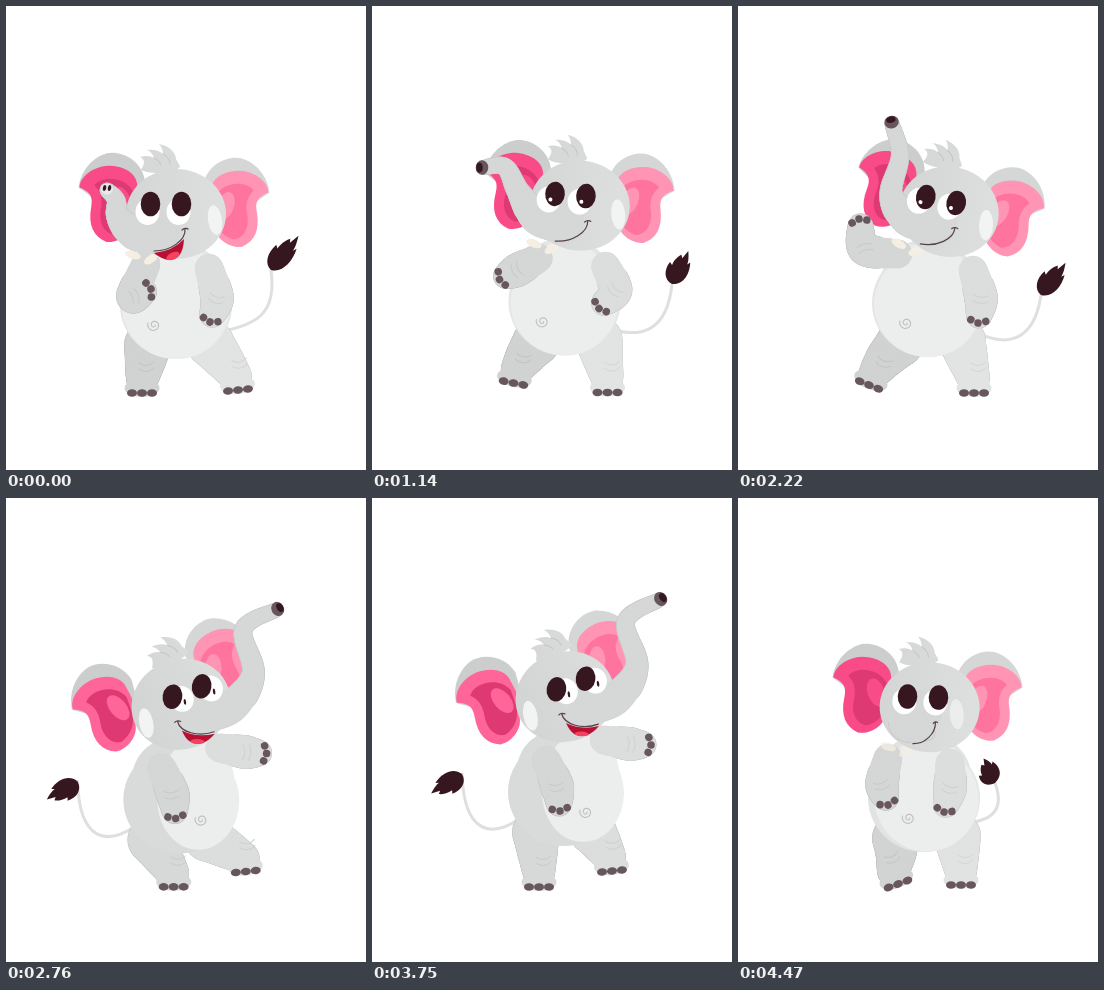
These frames come from a looping animation (360x464 px, 4500 ms). An HTML page with a canvas:

```html
<!DOCTYPE html>
<html lang="en">
<head>
<meta charset="utf-8">
<title>Dancing elephant</title>
<style>
html, body { margin: 0; width: 100%; height: 100%; overflow: hidden; background: #fff; }
canvas { display: block; width: 360px; height: 464px; }
</style>
</head>
<body>
<canvas id="stage"></canvas>
<script>
const LOOP = 4500, STEP = 30, RAD = Math.PI / 180;
const canvas = document.getElementById('stage');
const ratio = window.devicePixelRatio || 1;
canvas.width = 360 * ratio;
canvas.height = 464 * ratio;
const ctx = canvas.getContext('2d');

const BROWN = '#67565c', DARK = '#37171f';
const grey = v => `rgb(${v},${v + 1},${v + 1})`;

// face: turn (-1 left, 1 right), mouth opening, trunk tip (-1 nostrils, 1 dark cap)
const curled = {
  face: [-1, 1, -1], head: [160, 198, 0], gaze: [-3, 8], body: [170, 299],
  trunk: [152, 226, 129, 227, 112, 211, 110, 194, 101, 184],
  armL: [140, 258, 127, 290, 145, 283], armR: [203, 262, 211, 292, 204, 316],
  footL: [136, 387, 0], footR: [232, 384, -6], tail: [272, 314, 265, 264, 290, 228]
};
const reachLeft = {
  face: [-1, 0, 1], head: [222, 188, -2], gaze: [-6, 7], body: [208, 294],
  trunk: [212, 217, 188, 215, 168, 190, 147, 176, 127, 192],
  armL: [185, 252, 176, 274, 176, 297], armR: [255, 258, 266, 278, 239, 290],
  footL: [142, 368, 22], footR: [236, 387, 0], tail: [308, 338, 319, 292, 321, 253]
};
const armOut = {
  face: [-1, 0, 1], head: [175, 190, 10], gaze: [-6, 5], body: [177, 297],
  trunk: [168, 214, 142, 207, 125, 182, 119, 146, 97, 131],
  armL: [148, 252, 115, 254, 79, 250], armR: [212, 262, 221, 290, 215, 315],
  footL: [141, 386, 0], footR: [235, 386, 0], tail: [282, 318, 281, 264, 306, 235]
};
const wave = {
  face: [-1, 0, 1], head: [203, 194, 11], gaze: [-6, 5], body: [190, 297],
  trunk: [197, 217, 169, 212, 153, 188, 162, 150, 154, 118],
  armL: [160, 248, 127, 243, 121, 213], armR: [235, 264, 243, 292, 240, 317],
  footL: [131, 379, 22], footR: [236, 387, 0], tail: [296, 338, 303, 289, 325, 255]
};
const reachRight = {
  face: [1, 1, 1], head: [239, 181, -9], gaze: [7, 8], body: [210, 294],
  trunk: [240, 211, 287, 205, 314, 169, 335, 139, 355, 167],
  armL: [200, 257, 209, 282, 217, 307], armR: [258, 247, 286, 258, 306, 272],
  footL: [186, 384, 0], footR: [234, 387, 0], tail: [110, 322, 116, 269, 87, 246]
};
const salute = {
  face: [1, .7, 1], head: [199, 186, -20], gaze: [8, 5], body: [192, 294],
  trunk: [208, 207, 243, 200, 265, 168, 254, 123, 287, 102],
  armL: [174, 262, 185, 288, 188, 313], armR: [232, 242, 258, 246, 279, 247],
  footL: [167, 389, 0], footR: [240, 373, -6], tail: [92, 336, 90, 276, 61, 298]
};
const front = {
  face: [-.7, 0, 0], head: [185, 199, 2], gaze: [-3, 5], body: [186, 300],
  trunk: [182, 214, 168, 221, 166, 231, 177, 236, 190, 235],
  armL: [150, 260, 144, 286, 150, 307], armR: [212, 265, 212, 290, 206, 314],
  footL: [160, 386, -20], footR: [223, 387, 0], tail: [270, 320, 257, 285, 243, 262]
};

function shift(pose, dx, dy) {
  const moved = { ...pose };
  for (const k of ['head', 'body', 'trunk', 'armL', 'armR', 'tail'])
    moved[k] = pose[k].map((v, i) => k === 'head' && i === 2 ? v : v + (i % 2 ? dy : dx));
  return moved;
}

const keys = [
  [0, curled], [720, reachLeft], [1560, armOut], [1860, shift(armOut, -14, 0)],
  [2220, wave], [2700, shift(salute, -20, 8)], [3240, reachRight],
  [3750, salute], [3990, shift(salute, -6, -8)], [4440, front], [LOOP, front]
];

function poseAt(t) {
  const n = keys.findIndex(k => k[0] > t);
  const [t0, a] = keys[n - 1], [t1, b] = keys[n];
  const u = (t - t0) / (t1 - t0), e = u * u * (3 - 2 * u);
  const pose = {};
  for (const k in a) pose[k] = a[k].map((v, i) => v + (b[k][i] - v) * e);
  return pose;
}

function ellipse(x, y, rx, ry, fill, turn = 0) {
  ctx.fillStyle = fill;
  ctx.beginPath();
  ctx.ellipse(x, y, rx, ry, turn, 0, 2 * Math.PI);
  ctx.fill();
}

function within(x, y, angle, paint) {
  ctx.save();
  ctx.translate(x, y);
  ctx.rotate(angle);
  paint();
  ctx.restore();
}

// Points along a smooth curve through a flat x,y list
function spline(flat) {
  const n = flat.length / 2 - 1, out = [];
  const at = (i, c) => flat[2 * Math.max(0, Math.min(n, i)) + c];
  for (let s = 0; s <= n * 24; s++) {
    const i = Math.min(n - 1, Math.floor(s / 24)), u = s / 24 - i;
    const mix = c => {
      const p = at(i - 1, c), q = at(i, c), r = at(i + 1, c), w = at(i + 2, c);
      return q + .5 * u * (r - p + u * (2 * p - 5 * q + 4 * r - w + u * (3 * (q - r) + w - p)));
    };
    out.push([mix(0), mix(1), s / (n * 24)]);
  }
  return out;
}

function tube(flat, radii, shade, edgeFrom = 0) {
  const points = spline(flat), last = radii.length - 1;
  const radius = u => {
    const i = Math.min(last - 1, Math.floor(u * last)), v = u * last - i;
    return radii[i] + (radii[i + 1] - radii[i]) * v;
  };
  for (const [x, y, u] of points)
    if (u >= edgeFrom) ellipse(x, y, radius(u), radius(u), grey(shade - 14));
  for (const [x, y, u] of points) ellipse(x, y, radius(u) - .8, radius(u) - .8, grey(shade));
}

function toes(x, y, angle, gap, bend) {
  within(x, y, angle, () => {
    for (const i of [-1, 0, 1]) ellipse(i * gap, i ? -bend : 0, gap * .5, 3.8, BROWN, -i * bend * .15);
  });
}

function strokeCurve(x, y, curve, color, width) {
  ctx.strokeStyle = color;
  ctx.lineWidth = width;
  ctx.lineCap = 'round';
  ctx.beginPath();
  ctx.moveTo(x, y);
  ctx.bezierCurveTo(...curve);
  ctx.stroke();
}

const earBack = new Path2D('M-34-18C-30-38-10-46 2-43C16-39 27-26 29-10L0 10L-30 30Z');
const earPink = new Path2D('M-27-11C-27-24-14-31 1-31C16-30 28-20 28-10C18-6 15-1 17 9C20 26 15 37 3 42C-9 44-22 34-23 24C-30 14-29-1-27-11Z');
const earFold = new Path2D('M-24-4C-17-21 7-22 14-12C7-6 6 3 8 12C10 25 4 34-5 35C-16 32-24 22-24 10Z');
const hairShape = new Path2D('M-25-30C-20-38-22-41-26-43C-20-45-15-44-12-42C-13-46-16-49-19-50C-12-51-6-49-3-46C-3-50-5-54-7-56C4-54 10-47 10-41L14-34C14-28-14-24-25-30Z');
const tuftShape = new Path2D('M0 0C-9-1-13-10-10-20L-7-18C-7-24-4-29-2-31L0-28L3-37C6-31 7-27 7-24L9-27C13-16 11-3 0 0Z');

function ear(side, turn, pink, fold, shade) {
  const far = Math.max(0, side * turn);
  ctx.save();
  ctx.translate(-5.5 - 14.5 * turn + side * (64 + 2 * far), -6 - 5 * turn - 5 * far);
  ctx.scale(side * 1.05, 1.04);
  ctx.fillStyle = grey(shade);
  ctx.fill(earBack);
  ctx.fillStyle = pink;
  ctx.fill(earPink);
  ctx.fillStyle = fold;
  ctx.fill(earFold);
  ellipse(-13, 3, 8, 14, pink, .35);
  ctx.restore();
}

function leg(hipX, hipY, [x, y, deg], shade) {
  const a = deg * RAD, ankleX = x + 15 * Math.sin(a), ankleY = y - 13 * Math.cos(a);
  tube([hipX, hipY, (hipX + ankleX) / 2 - Math.sin(a) * 4, (hipY + ankleY) / 2, ankleX, ankleY],
    [24, 20, 15.5], shade);
  within(x, y, a, () => ellipse(0, -5, 17.5, 9, grey(shade)));
  toes(x, y, a, 10, 0);
  within(ankleX, ankleY, a, () => {
    for (const d of [-17, -11])
      strokeCurve(-3, d, [2, d + 4, 8, d + 3, 12, d - 1], grey(shade - 14), 1);
  });
}

function arm([sx, sy, ex, ey, hx, hy], shade) {
  const a = Math.atan2(hy - ey, hx - ex);
  tube([sx, sy, ex, ey, hx - 7 * Math.cos(a), hy - 7 * Math.sin(a)], [15, 17, 12.5], shade, .3);
  toes(hx, hy, a - Math.PI / 2, 7.5, 2.5);
  within(ex, ey, a - Math.PI / 2, () => {
    for (const d of [-3, 3])
      strokeCurve(-8, d, [-4, d + 3, 3, d + 3, 7, d], grey(shade - 13), 1);
  });
}

function tail([cx, cy, bx, by, tx, ty], x, y) {
  strokeCurve(x, y, [(x + cx) / 2, cy + 4, cx, cy, bx, by], grey(222), 3);
  const length = Math.hypot(tx - bx, ty - by);
  within(bx, by, Math.atan2(ty - by, tx - bx) + Math.PI / 2, () => {
    ctx.scale(1, length / 37);
    ctx.fillStyle = DARK;
    ctx.fill(tuftShape);
  });
}

function headShape(turn) {
  const shading = ctx.createLinearGradient(-50, 0, 50, 0);
  shading.addColorStop(0, grey(211));
  shading.addColorStop(1, grey(221));
  ellipse(-10 * turn, 10, 50, 45, shading);
  within(0, -4, 0, () => {
    ctx.fill(hairShape);
    strokeCurve(-12, -42, [-8, -40, -6, -38, -5, -35], grey(196), 1);
    strokeCurve(-3, -46, [2, -43, 4, -40, 4, -36], grey(196), 1);
  });
  ctx.globalAlpha = Math.min(1, Math.abs(turn));
  ellipse(-49 * turn, 16, 7, 15, '#f2f3f3', .15 * turn);
  ctx.globalAlpha = 1;
}

function eyes(turn, gaze, glint) {
  const right = Math.max(0, turn);
  for (const x of [-15.5, 15.5]) {
    ellipse(x + gaze[0], gaze[1], 12, 13, '#fff');
    ellipse(x, 0, 9.8, 12.3, DARK, .5 * right);
    ctx.globalAlpha = right;
    ellipse(x + 10, 9, 1.2, 3, DARK, .2);
    ctx.globalAlpha = glint * (1 - right);
    ellipse(x + gaze[0] * .7, 6, 2, 2, '#fff');
    ctx.globalAlpha = 1;
  }
}

function mouth(turn, open) {
  const s = -turn;
  if (open > .05) {
    ctx.fillStyle = '#b80f32';
    ctx.beginPath();
    ctx.moveTo(18 * s, 35);
    ctx.quadraticCurveTo(7 * s, 47, -12 * s, 49);
    ctx.bezierCurveTo(0, 49 + 10 * open, 17 * s, 47 + 14 * open, 18 * s, 35);
    ctx.fill();
    ellipse(7 * s, 47 + 5 * open, 7, 3.4 * open, '#f5435f', -.4 * s);
  }
  strokeCurve(19 * s, 25, [20 * s, 36, 5 * s, 47, -12 * s, 47], '#574049', 1.2);
  strokeCurve(16 * s, 26, [18 * s, 24, 21 * s, 24, 22 * s, 25], '#574049', 1.2);
}

function trunk(points, tip) {
  tube(points, [23, 18, 11.5, 9.2, 7.5], 214, .35);
  const [ax, ay, x, y] = points.slice(-4);
  const angle = Math.atan2(y - ay, x - ax);
  if (tip > 0) {
    ctx.globalAlpha = Math.min(1, tip);
    within(x, y, angle, () => {
      ellipse(2, 0, 6.3, 7.3, BROWN);
      ellipse(4.5, 0, 3.2, 4.8, DARK);
    });
    ctx.globalAlpha = 1;
  } else if (tip < -.3) {
    ellipse(x, y - 1, 6, 5.5, grey(232));
    for (const d of [-2.5, 2.5]) ellipse(x + d, y - 2, 1.7, 3, DARK, .2);
  }
}

function belly(x, y, turn) {
  const right = (turn + 1) / 2, shade = Math.round(228 - 11 * right);
  ellipse(x, y - 22, 47, 42, grey(shade));
  ellipse(x, y, 56, 54, grey(shade));
  const cx = x + 19 * right;
  ellipse(cx, y + 1, 54 - 13 * right, 53 - 4 * right, grey(236));
  ellipse(cx, y - 18, 44 - 8 * right, 42, grey(236));
  ctx.strokeStyle = grey(190);
  ctx.lineWidth = 1.1;
  ctx.beginPath();
  for (let a = 0; a < 10; a += .25)
    ctx.lineTo(x + 22 * turn + Math.cos(a) * (1 + a * .56), y + 20 + Math.sin(a) * (1 + a * .56));
  ctx.stroke();
}

function tusks(turn) {
  ctx.globalAlpha = Math.max(0, -turn);
  ellipse(-33, 51, 8, 4, '#f5eee2', .3);
  ellipse(-15, 55, 8, 4, '#f5eee2', -.6);
  ctx.globalAlpha = 1;
}

function draw(t) {
  const p = poseAt(t);
  const [turn, open, tip] = p.face, [x, y] = p.body, [hx, hy, tilt] = p.head;
  const right = (turn + 1) / 2;
  const inHead = paint => within(hx, hy, tilt * RAD, paint);

  ctx.setTransform(ratio, 0, 0, ratio, 0, 0);
  ctx.fillStyle = '#fff';
  ctx.fillRect(0, 0, 360, 464);

  tail(p.tail, x - 45 * turn, y + 27);
  inHead(() => {
    ear(-1, turn, turn > 0 ? '#ff6598' : '#f94b87', '#df3974', 204);
    ear(1, turn, '#ff94b5', '#ff749e', 213);
  });
  leg(x - 28, y + 40, p.footL, Math.round(209 + 6 * right));
  leg(x + 34 - 6 * right, y + 38, p.footR, Math.round(226 - 6 * right));
  belly(x, y, turn);
  arm(p.armL, 213);
  arm(p.armR, 220);
  inHead(() => {
    tusks(turn);
    headShape(turn);
  });
  trunk(p.trunk, tip);
  inHead(() => {
    eyes(turn, p.gaze, Math.max(0, tip) * (1 - open));
    mouth(turn, open);
  });
}

const start = performance.now();
function tick() {
  const t = (performance.now() - start) % LOOP;
  draw(Math.floor(t / STEP) * STEP);
  requestAnimationFrame(tick);
}
tick();
</script>
</body>
</html>
```
